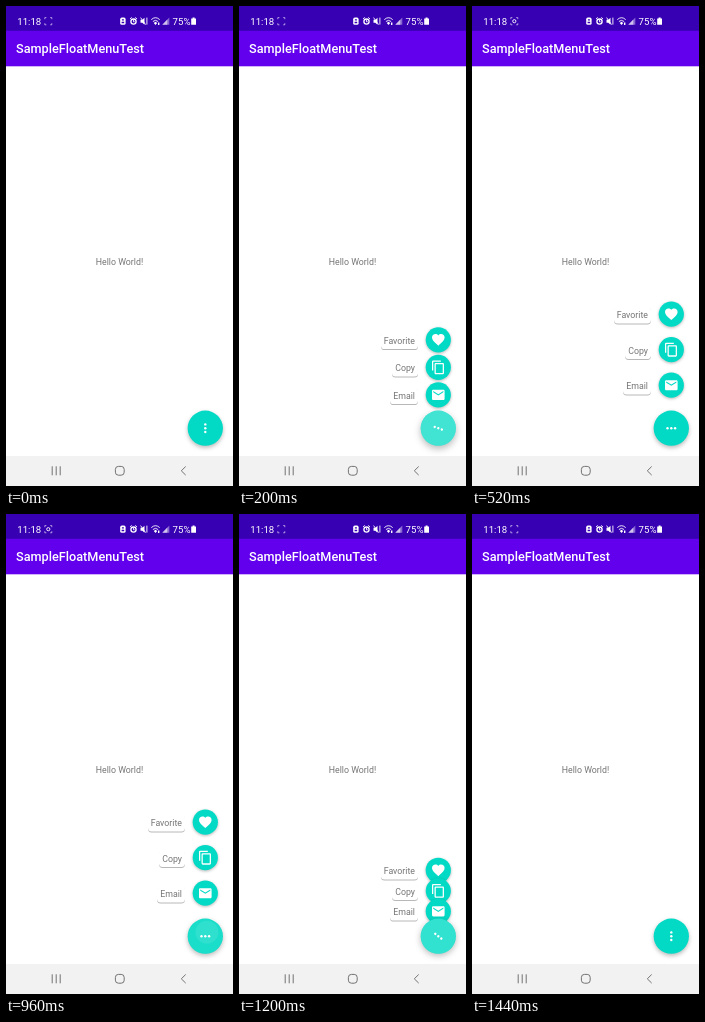
Animation, 227 px wide and 480 px high, one loop 1.52 s. Source, as an HTML page:

```html
<!DOCTYPE html>
<html lang="en">
<head>
<meta charset="utf-8">
<title>Speed dial</title>
<style>
  html, body { margin: 0; width: 100%; height: 100%; overflow: hidden; background: #fff; }
  svg { display: block; width: 100vw; height: 100vh; }
  text { font-family: Roboto, sans-serif; }
  .status { fill: #fff; font-size: 9.6px; }
  .title { fill: #fff; font-size: 12.7px; font-weight: 500; }
  .body, .label text { fill: #757575; font-size: 8.8px; }
  .label rect { fill: #fff; filter: drop-shadow(0 1.2px .7px rgba(0, 0, 0, .28)); }
  .mini { fill: #03dac5; filter: drop-shadow(0 1.5px 1.8px rgba(0, 0, 0, .28)); }
  .line { fill: none; stroke: #fff; stroke-width: .9; }
  .nav { fill: none; stroke: #727272; stroke-width: 1; }
</style>
</head>
<body>
<svg viewBox="0 0 227 480">
  <defs><clipPath id="disc"><circle r="17.65"/></clipPath></defs>
  <rect width="227" height="480" fill="#fff"/>
  <rect width="227" height="60.3" fill="#6200ee"/>
  <rect width="227" height="24.8" fill="#3700b3"/>

  <!-- status bar -->
  <text class="status" x="11.3" y="18.6">11:18</text>
  <path class="line" opacity=".65" d="M38.8 13.2v-1.6h1.6M44.2 11.6h1.6v1.6M45.8 17.2v1.6h-1.6M40.4 18.8h-1.6v-1.6"/>
  <circle id="rec" class="line" cx="42.3" cy="15.2" r="1.6"/>
  <rect x="114.2" y="11.6" width="5.4" height="7.2" rx="1.6" fill="#fff"/>
  <path fill="#3700b3" d="M115.9 13.2h2v1.3h-2zM115.6 15.8h2.6v1.4h-2.6z"/>
  <circle cx="127.5" cy="15.6" r="2.6" class="line" style="stroke-width: 1.3"/>
  <path class="line" d="M127.5 14v1.8h1.2M124 12.9l1.8-1.5M131 12.9l-1.8-1.5"/>
  <path fill="#fff" d="M134.5 13.7h1.8l2.2-2v7l-2.2-2h-1.8z"/>
  <path class="line" d="M134.6 11.6l5 7M140.9 11.6v7"/>
  <path class="line" d="M145.3 13.6q4.2-3.8 8.4 0M146.9 15.5q2.6-2.3 5.2 0"/>
  <path fill="#fff" d="M147.8 17l1.7-1.2 1.7 1.2-1.7 2zM152 16.6h1.4v2.4h-1.4z"/>
  <path fill="#fff" opacity=".4" d="M163.3 11.4v7.4h-7z"/>
  <path fill="#fff" opacity=".6" d="M161.3 13.6v5.2h-5z"/>
  <text class="status" x="166.6" y="18.6">75%</text>
  <path fill="#fff" d="M186.6 11.5h2v.9h1.4v6.3h-4.8v-6.3h1.4z"/>

  <text class="title" x="10" y="47.3">SampleFloatMenuTest</text>
  <text class="body" x="113.5" y="258.7" text-anchor="middle">Hello World!</text>

  <g id="items"></g>

  <g transform="translate(199.3 422.2)">
    <circle id="fab" r="17.65" fill="#03dac5"/>
    <g clip-path="url(#disc)" fill="#fff">
      <circle id="glow" r="17.65"/>
      <circle id="ripple"/>
    </g>
    <g id="dots" fill="#fff">
      <circle cy="-3.8" r="1.2"/><circle r="1.2"/><circle cy="3.8" r="1.2"/>
    </g>
  </g>

  <!-- navigation bar -->
  <rect y="450" width="227" height="30" fill="#f2f2f2"/>
  <path class="nav" d="M46.2 460.3v9M50.2 460.3v9M54.2 460.3v9"/>
  <rect class="nav" x="109.4" y="460.4" width="8.8" height="8.8" rx="3"/>
  <path class="nav" d="M179.7 460.5l-4.4 4.3 4.4 4.3"/>
</svg>
<script>
const LOOP = 1520, STEP = 40, FAB_Y = 422.2;
const $ = id => document.getElementById(id);
const clamp = x => Math.min(1, Math.max(0, x));
const ramp = (t, from, to) => clamp((t - from) / (to - from));

const ITEMS = [
  { name: 'Favorite', rise: 114, left: 142, icon: 'M12 21.35l-1.45-1.32C5.4 15.36 2 12.28 2 8.5 2 5.42 4.42 3 7.5 3c1.74 0 3.41.81 4.5 2.09C13.09 3.81 14.76 3 16.5 3 19.58 3 22 5.42 22 8.5c0 3.78-3.4 6.86-8.55 11.54z' },
  { name: 'Copy', rise: 78.5, left: 153, icon: 'M16 1H4c-1.1 0-2 .9-2 2v14h2V3h12zm3 4H8c-1.1 0-2 .9-2 2v14c0 1.1.9 2 2 2h11c1.1 0 2-.9 2-2V7c0-1.1-.9-2-2-2zm0 16H8V7h11z' },
  { name: 'Email', rise: 43, left: 151, icon: 'M20 4H4c-1.1 0-2 .9-2 2v12c0 1.1.9 2 2 2h16c1.1 0 2-.9 2-2V6c0-1.1-.9-2-2-2zm0 4l-8 5-8-5V6l8 5 8-5z' }
];

$('items').innerHTML = ITEMS.map(({ name, left, icon }) => `<g>
  <g class="label">
    <rect x="${left}" y="-7.6" width="${179 - left}" height="16.8" rx="3.6"/>
    <text x="176" y="4.1" text-anchor="end">${name}</text>
  </g>
  <circle class="mini" cx="199.3" r="12.6"/>
  <path fill="#fff" transform="translate(191.74 -7.56) scale(.63)" d="${icon}"/>
</g>`).join('');
const groups = [...$('items').children];

// cubic-bezier(.4, 0, .2, 1), solved by bisection
function ease(x) {
  let lo = 0, hi = 1;
  for (let i = 0; i < 24; i++) {
    const s = (lo + hi) / 2, r = 1 - s;
    if (1.2 * r * r * s + .6 * r * s * s + s ** 3 < x) lo = s; else hi = s;
  }
  return lo * lo * (3 - 2 * lo);
}

// Touch feedback: press start, start and end of the fade
const PRESSES = [
  { down: 25, fade: 250, end: 510 },
  { down: 945, fade: 1130, end: 1410 }
];

function drawPress(t) {
  const { down, fade, end } = PRESSES[t < 800 ? 0 : 1];
  const grow = 1 - (1 - ramp(t, down, down + 150)) ** 2;
  const left = t < down ? 0 : 1 - ramp(t, fade, end);
  const lift = ramp(t, down, down + 110) * (1 - ramp(t, fade + 10, fade + 150));
  $('glow').setAttribute('opacity', .09 * left);
  $('ripple').setAttribute('opacity', (.07 + .1 * grow) * left);
  $('ripple').setAttribute('r', 9 + 13 * grow);
  $('ripple').setAttribute('cx', 2 * (1 - grow));
  $('ripple').setAttribute('cy', -5 * (1 - grow));
  $('fab').style.filter =
    `drop-shadow(0 ${2 + 1.6 * lift}px ${2.2 + 1.6 * lift}px rgba(0,0,0,.27))`;
}

function draw(now) {
  const t = Math.floor(now % LOOP / STEP) * STEP;
  const open = ease(ramp(t, 75, 325)) - ease(ramp(t, 1120, 1370));
  groups.forEach((g, i) => {
    g.setAttribute('transform', `translate(0 ${FAB_Y - ITEMS[i].rise * open})`);
  });
  $('items').setAttribute('opacity', clamp(open / .4));
  $('dots').setAttribute('transform', `rotate(${-90 * open})`);
  $('rec').setAttribute('opacity', t >= 480 && t < 1040 ? 1 : 0);
  drawPress(t);
}

const start = performance.now();
function tick() {
  draw(performance.now() - start);
  requestAnimationFrame(tick);
}
tick();
</script>
</body>
</html>
```
